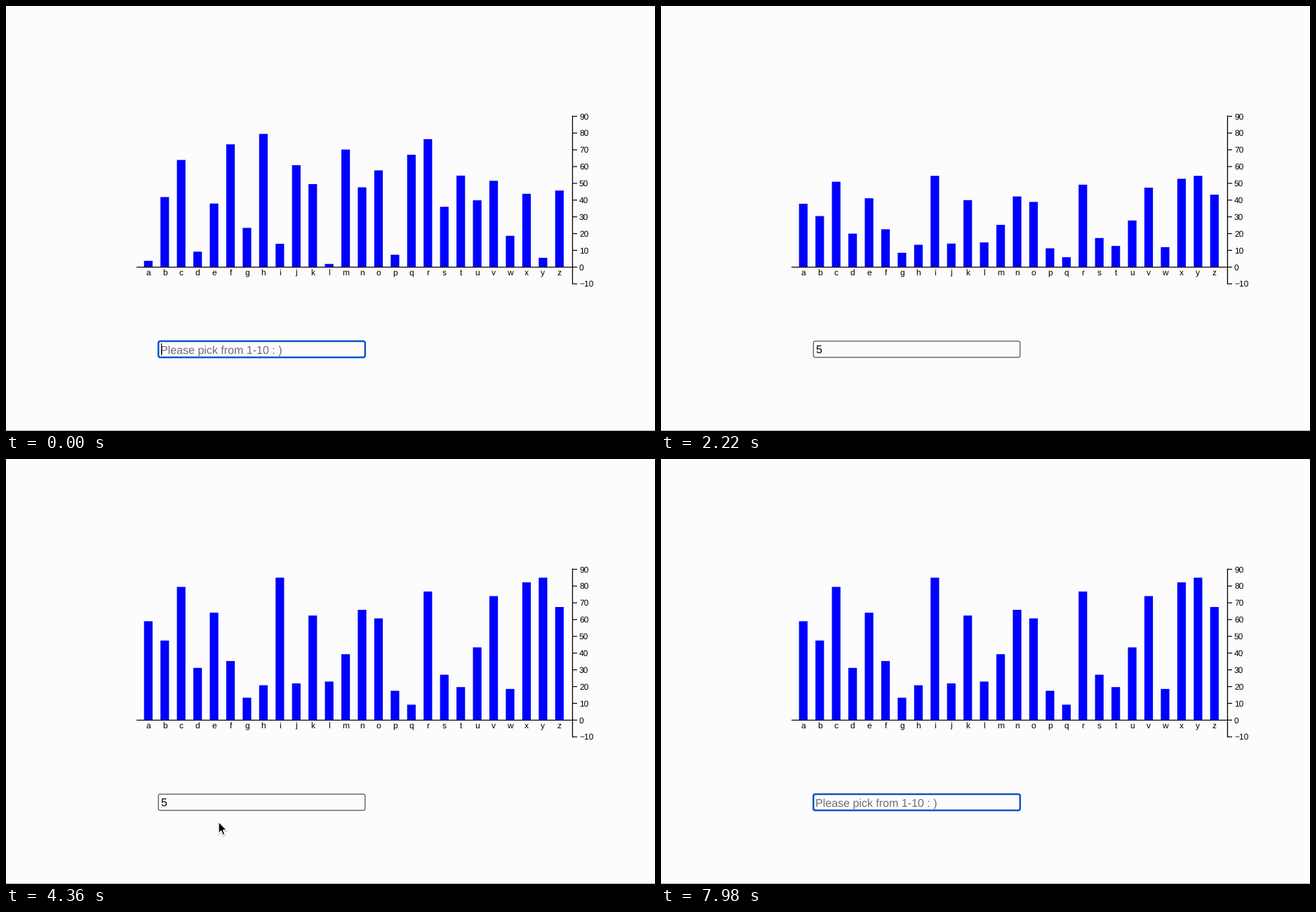
Write a matplotlib script that moves like this. It is 925 px wide and 606 px high and loops after 8000 ms.

```python
import numpy as np
import matplotlib.pyplot as plt
from matplotlib.animation import FuncAnimation
from matplotlib.patches import FancyBboxPatch, Polygon, Rectangle
from matplotlib.transforms import Affine2D

W, H, DPI = 925, 606, 100
LOOP, STEP = 8000, 40
PT = 72 / DPI
BG, BLUE, RING = "#fcfcfc", "#0000ff", "#0b55c9"
LETTERS = "abcdefghijklmnopqrstuvwxyz"
BASE, UNIT, PITCH = 372.3, 2.389, 23.44

plt.rcParams["font.family"] = "Liberation Sans"
plt.rcParams["text.hinting"] = "none"

# Timeline in ms
TYPED, ENTER, GROW, GROW_LEN = 1480, 1660, 1703, 900
SHOW, MOVE, REST, ENTRY, STOP = 2500, 2640, 3520, 4220, 4780
CLICK, CARET_OFF, ERASE = 5600, 7020, 7560
BLINK = 480


def spread(order, ranks, values):
    """Values for a to z, given the letters from shortest to tallest."""
    by_rank = np.interp(range(26), ranks, values)
    return np.array([by_rank[order.index(c)] for c in LETTERS])


FIRST = spread("laypdiwgseubxznkvtojcqmfrh",
               (0, 4, 7, 8, 16, 25), (1.9, 9.2, 23.4, 36, 51.5, 79.5))
SECOND = spread("qgpwthjlsdfmubaokenzvrcxyi",
                (0, 2, 7, 13, 14, 19, 20, 24), (9.2, 17.5, 23, 47.5, 59, 67.5, 74, 85))

fig = plt.figure(figsize=(W / DPI, H / DPI), dpi=DPI, facecolor=BG)
ax = fig.add_axes([0, 0, 1, 1])
ax.set(xlim=(0, W), ylim=(H, 0))
ax.axis("off")


def rect(x, y, w, h, color, z=2):
    return ax.add_patch(Rectangle((x, y), w, h, fc=color, ec="none", lw=0, snap=False, zorder=z))


def label(x, y, s, size, color="black", ha="left"):
    return ax.text(x, y, s, fontsize=size * PT, color=color, ha=ha, va="baseline", zorder=4)


def field(color, width):
    style = "round,pad=0,rounding_size=2.6"
    return ax.add_patch(FancyBboxPatch((217.2, 477.9), 294.6, 23.1, boxstyle=style,
                                       fc=BG, ec=color, lw=width * PT, zorder=3))


rect(0, 605, W, 1, "#a6a6a6")

# Chart
bars = []
for i, c in enumerate(LETTERS):
    cx = 202.8 + PITCH * i
    bars.append(rect(cx - 6.1, BASE, 12.2, 0, BLUE))
    label(cx, 384, c, 12, ha="center")
rect(186, 371.8, 622, 1.2, "black", 3)
rect(806.8, 156.4, 1.3, 240.4, "black", 3)
for v in range(-10, 91, 10):
    y = BASE - UNIT * v
    rect(807, y - 0.6, 7, 1.2, "black", 3)
    label(817, y + 4.1, str(v).replace("-", "\u2212"), 12)

# Input
idle = field("#4c4c52", 1.2)
focus = field(RING, 2.5)
hint = label(220.5, 495.2, "Please pick from 1-10 : )", 16, "#6f6f74")
typed = label(220.5, 495.2, "5", 16)
caret = rect(221, 481, 1.2, 17, "black", 5)

# Pointers, drawn around their hot spot
ARROW = [(0, 0), (0, 16.4), (3.7, 13), (6.3, 19), (9, 17.8), (6.5, 12), (11.4, 11.6)]
arrow = [
    ax.add_patch(Polygon(ARROW, fc="black", ec="black", alpha=0.12, lw=2.5 * PT, zorder=7)),
    ax.add_patch(Polygon(ARROW, fc="black", ec="white", lw=1.3 * PT, joinstyle="round", zorder=8)),
]
u = np.linspace(-1, 1, 15)
hook = np.column_stack([4 * u, -8.5 + 2.5 * (1 - abs(u)) ** 2])
gap = [(np.nan, np.nan)]
beam_pts = np.vstack([hook, gap, hook * (1, -1), gap, [(0, -6.5), (0, 6.5)], gap, [(-2, 0), (2, 0)]])
beam = [ax.plot(*beam_pts.T, color=c, lw=w * PT, zorder=z)[0]
        for c, w, z in (("white", 3.4, 7), ("black", 1.5, 8))]


def progress(t, start, length):
    return min(max((t - start) / length, 0), 1)


def cubic(p):
    return 4 * p ** 3 if p < 0.5 else 1 - 4 * (1 - p) ** 3


def pointer(t):
    down = progress(t, MOVE, REST - MOVE)
    up = progress(t, ENTRY, STOP - ENTRY)
    start, low, end = np.array([(223, 241), (305, 525), (297, 494)])
    return start + (low - start) * np.sin(down * np.pi / 2) + (end - low) * up


def caret_on(t):
    if t < TYPED:
        return t % (2 * BLINK) < BLINK and t < 2.9 * BLINK
    if t < ERASE:
        return t < ENTER or CLICK <= t < CARET_OFF
    return t < ERASE + 400


def place(parts, x, y, on, drop=0):
    for k, part in enumerate(parts):
        dy = drop if k == 0 else 0
        part.set_transform(Affine2D().translate(x, y + dy) + ax.transData)
        part.set_visible(on)


def draw(n):
    t = n * STEP
    values = FIRST if t < ENTER else SECOND * cubic(progress(t, GROW, GROW_LEN))
    for bar, v in zip(bars, values):
        bar.set_y(BASE - UNIT * v)
        bar.set_height(UNIT * v)

    focused = t < ENTER or t >= CLICK
    filled = TYPED <= t < ERASE
    focus.set_visible(focused)
    idle.set_visible(not focused)
    typed.set_visible(filled)
    hint.set_visible(not filled)
    caret.set_x(229.8 if filled else 221)
    caret.set_visible(caret_on(t))

    x, y = pointer(t)
    shown = SHOW <= t < ERASE
    inside = 477 <= y <= 502
    place(arrow, x, y, shown and not inside, drop=1.5)
    place(beam, x, y - 0.5, shown and inside)
    return []


anim = FuncAnimation(fig, draw, frames=LOOP // STEP, interval=STEP, repeat=True,
                     repeat_delay=0, blit=False)
plt.show()
```
